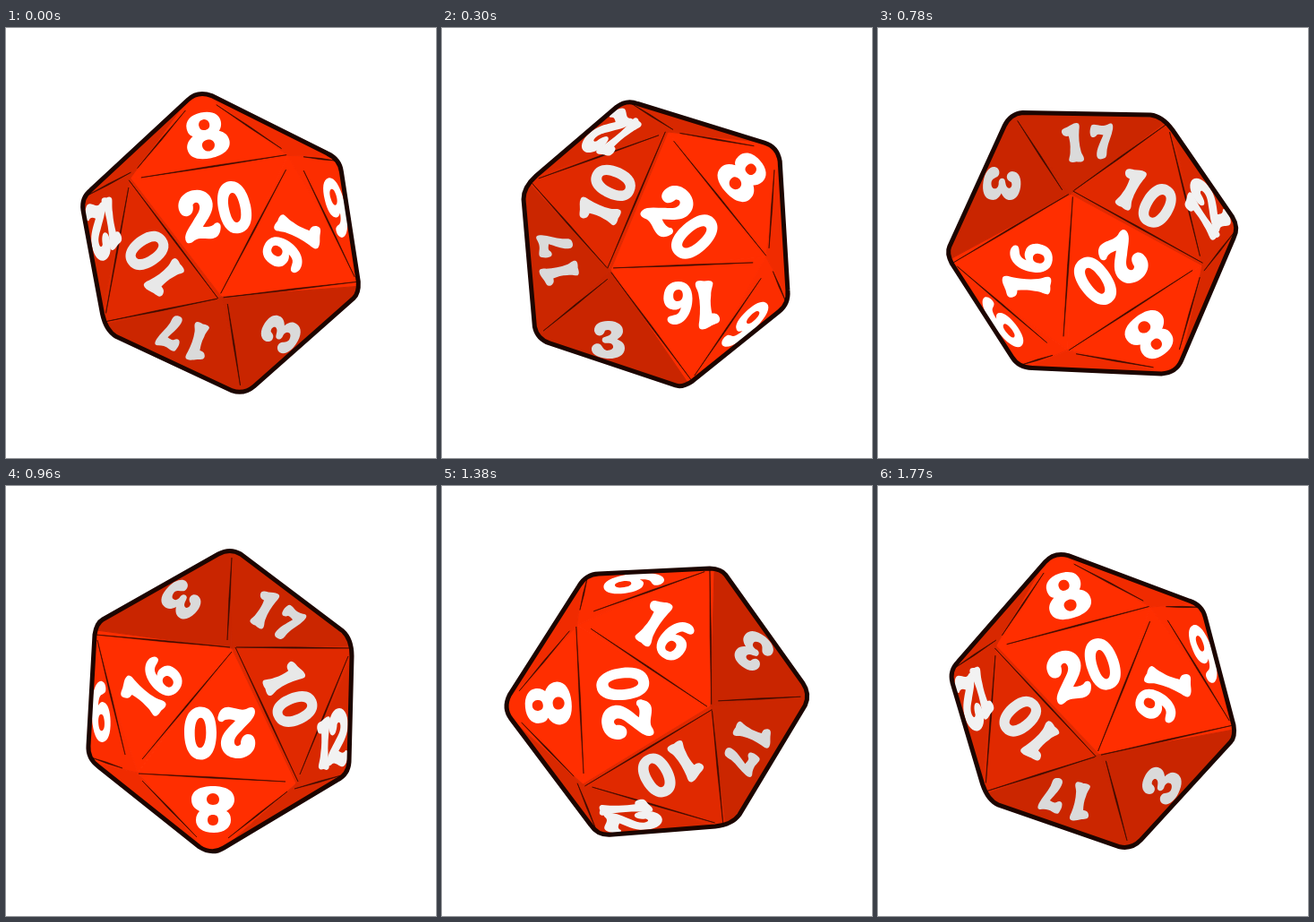
Write an HTML page that moves like this. It is 480 px wide and 480 px high and loops after 1.8 s.

```html
<!DOCTYPE html>
<html lang="en">
<head>
<meta charset="utf-8">
<title>Spinning d20</title>
<style>
  html, body { margin: 0; width: 100%; height: 100%; overflow: hidden; background: #fff; }
  svg { display: block; width: 100%; height: 100%; }
</style>
</head>
<body>
<svg viewBox="0 0 480 480">
  <defs>
    <path id="rim" d="M94 290Q94 309 104 318L218 404Q230 411 243 404L372 331Q379 327 381 314L388 190Q389 176 377 167L264 77Q250 68 237 76L110 152Q98 158 97 172Z"/>
    <clipPath id="body"><use href="#rim"/></clipPath>
  </defs>
  <g id="die">
    <g id="faces" clip-path="url(#body)"></g>
    <g id="edges" fill="#3a0b00" stroke="#3a0b00" stroke-width=".6"></g>
    <g id="digits" fill-rule="evenodd"></g>
    <use href="#rim" fill="none" stroke="#1c0500" stroke-width="5" stroke-linejoin="round"/>
  </g>
</svg>
<script>
const $ = id => document.getElementById(id);

function add(parent, attrs) {
  const path = document.createElementNS('http://www.w3.org/2000/svg', 'path');
  for (const key in attrs) path.setAttribute(key, attrs[key]);
  $(parent).append(path);
}

// Corners of the visible half: P, Q, S bound the front face, A to F the rim.
const corner = {
  P: [156, 148], Q: [333, 160], S: [228, 299],
  A: [230, 416], B: [88, 302], C: [92, 156], D: [250, 64], E: [394, 174], F: [387, 320]
};
const faces = {
  PQS: '#ff2e00', PQD: '#ff2e00', QSF: '#ff2e00', QEF: '#fc2d00', QDE: '#f02b00',
  PSB: '#e02900', PBC: '#d82800', PCD: '#d82800', SBA: '#cb2600', SAF: '#c92500'
};
for (const name in faces) {
  const d = 'M' + [...name].map(c => corner[c]).join('L') + 'Z';
  add('faces', { d, fill: faces[name], stroke: faces[name] });
}

// Tapered pen strokes
const edges = [
  [224, 300, 154, 150], [228, 295, 328, 175], [332, 159, 168, 150],
  [380, 314, 230, 300], [223, 300, 94, 299], [228, 400, 233, 308],
  [378, 308, 347, 180], [385, 177, 350, 165], [328, 151, 267, 88],
  [232, 87, 166, 139], [152, 158, 98, 290], [158, 142, 102, 158]
];
for (const [x1, y1, x2, y2] of edges) {
  const len = Math.hypot(x2 - x1, y2 - y1);
  const nx = (y1 - y2) / len * 1.3, ny = (x2 - x1) / len * 1.3;
  const mx = (x1 + x2) / 2, my = (y1 + y2) / 2;
  add('edges', {
    d: `M${x1} ${y1}Q${mx + nx} ${my + ny} ${x2} ${y2}Q${mx - nx} ${my - ny} ${x1} ${y1}Z`
  });
}

// Each digit: width, height, outline
const glyphs = {
  0: [37, 58, 'M18 0C31 0 37 14 37 30C37 48 30 58 18 58C6 58 0 47 0 30C0 12 6 0 18 0ZM19 13C14 13 12 22 12 30C12 39 14 46 18 46C23 46 25 38 25 29C25 20 23 13 19 13Z'],
  1: [26, 55, 'M1 13C0 8 3 7 8 5C12 3 15 0 19 0C23 0 23 4 22 10C21 20 21 30 23 40C24 45 27 48 26 52C25 55 21 55 17 54C13 55 9 55 8 52C8 48 10 45 10 38C11 30 10 24 9 18C7 18 3 19 1 13Z'],
  2: [44, 58, 'M2 20C0 8 10 0 21 0C34 0 41 9 40 19C39 28 31 35 24 42C30 44 35 44 38 41C42 40 45 43 43 48C41 55 36 58 30 57C23 56 18 53 12 55C7 58 2 58 2 52C2 45 10 39 17 31C22 26 26 22 25 17C24 13 20 13 18 16C18 22 15 27 10 27C5 27 3 24 2 20Z'],
  3: [37, 42, 'M2 12C1 4 9 0 18 0C28 0 34 4 34 11C34 15 31 18 28 20C34 22 37 25 37 30C37 38 29 42 18 42C8 42 0 38 0 32C0 28 4 25 8 26C12 27 12 32 17 33C21 33 24 31 24 29C24 25 20 24 16 25C12 25 10 22 12 19C15 17 20 17 21 13C21 10 17 9 14 11C13 15 11 17 8 17C5 17 3 15 2 12Z'],
  6: [34, 48, 'M22 0C28 1 30 5 28 8C26 10 22 10 19 11C16 12 14 15 13 19C17 16 21 16 24 17C30 18 34 24 33 32C32 42 26 48 16 48C6 48 0 41 0 29C0 13 9 -1 22 0ZM17 26C13 26 11 29 11 33C11 37 13 39 16 39C20 39 22 36 22 32C22 28 20 26 17 26Z'],
  7: [32, 45, 'M2 4C3 0 7 1 11 2C17 4 22 3 27 1C31 0 32 3 31 8C29 17 24 24 22 33C21 38 22 42 18 44C13 46 8 45 8 40C8 32 14 23 18 15C14 14 11 13 9 15C6 18 2 18 1 14C0 10 1 7 2 4Z'],
  8: [48, 52, 'M23 0C36 0 43 6 43 14C43 19 41 22 39 24C45 27 48 31 48 37C48 47 38 52 24 52C10 52 0 47 0 37C0 31 4 27 9 24C5 22 4 18 4 14C4 6 11 0 23 0ZM24 8C20 8 18 11 18 14C18 18 20 20 24 20C28 20 30 18 30 14C30 11 28 8 24 8ZM24 31C19 31 17 34 17 37C17 41 20 44 24 44C28 44 31 41 31 37C31 34 28 31 24 31Z']
};

// Places a digit as seen when the die is turned by `turn` degrees.
function digit(char, turn, x, y, w, h, tilt, fill) {
  const [gw, gh, d] = glyphs[char];
  add('digits', {
    d, fill,
    transform: `rotate(${-turn} 240 240) translate(${x} ${y}) rotate(${tilt}) ` +
      `scale(${w / gw} ${h / gh}) translate(${-gw / 2} ${-gh / 2})`
  });
}
const white = '#fff', pale = '#e8e8e8', gray = '#dadada';
digit(2, 0, 222, 205, 44, 58, 0, white);
digit(0, 0, 263, 204, 36, 59, 0, white);
digit(8, 0, 249, 119, 48, 52, 0, white);
digit(1, 228, 183, 171, 28, 55, 0, white);
digit(6, 228, 217, 173, 33, 48, 0, white);
digit(6, 180, 106, 252, 21, 68, -4, white);
digit(1, 180, 354, 287, 17, 60, 4, '#f2f2f2');
digit(2, 180, 371, 281, 24, 66, 3, '#f2f2f2');
digit(1, 108, 236, 166, 27, 48, -5, pale);
digit(0, 108, 274, 164, 36, 51, -5, pale);
digit(1, 180, 287, 136, 24, 44, 33, gray);
digit(7, 180, 315, 154, 27, 40, 33, gray);
digit(3, 48, 186, 348, 37, 42, 3, gray);

// One turn per 1800 ms, in 60 steps
function draw() {
  const step = Math.floor(performance.now() % 1800 / 30);
  $('die').setAttribute('transform', `rotate(${step * 6 - 12} 240 240)`);
  requestAnimationFrame(draw);
}
draw();
</script>
</body>
</html>
```
